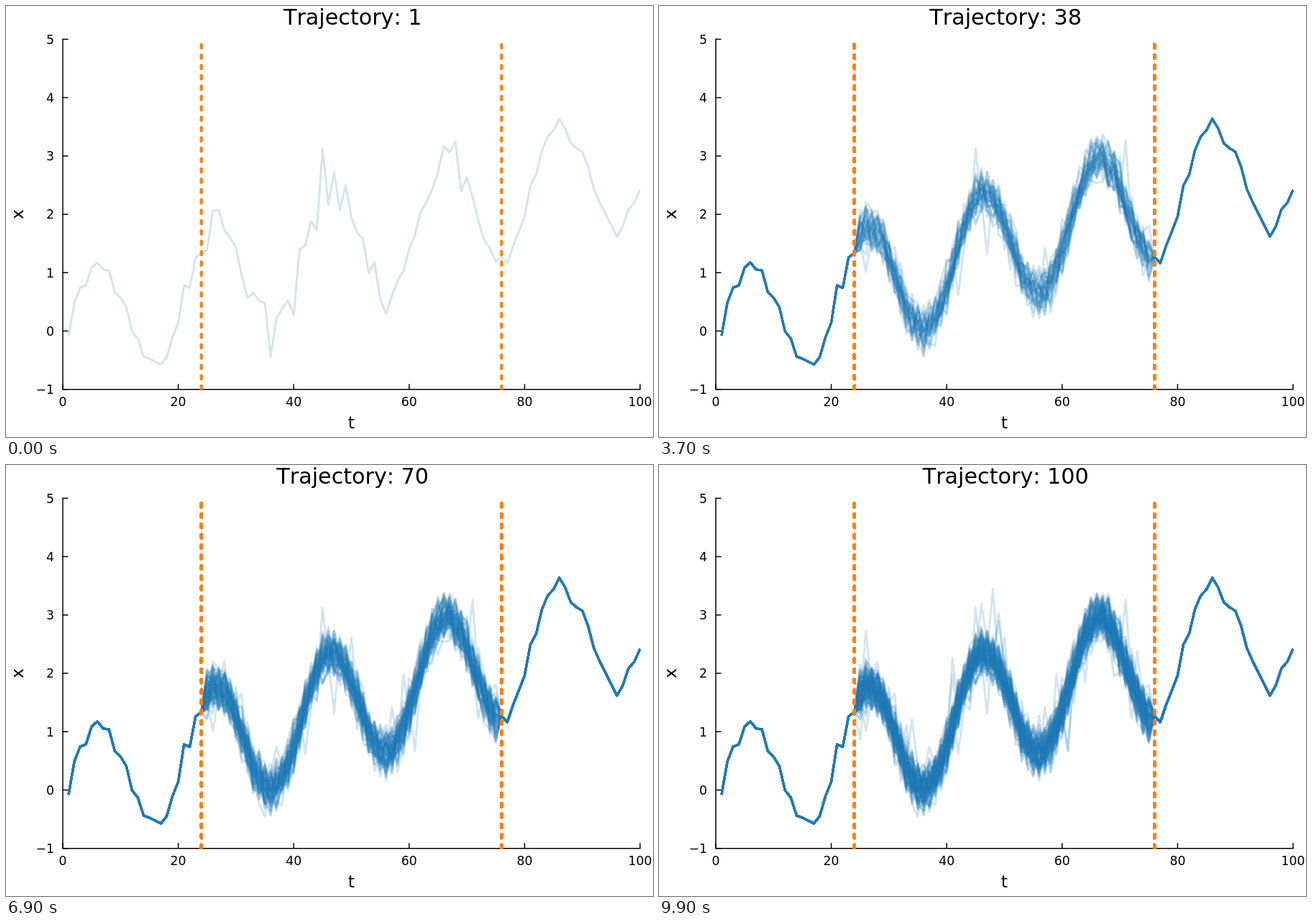
An HTML page with a canvas that plays this animation: 900 px wide and 600 px high, repeating every 10 s.

```html
<!DOCTYPE html>
<html lang="en">
<head>
<meta charset="utf-8">
<title>Trajectories</title>
<style>
  html, body { margin: 0; width: 100%; height: 100%; overflow: hidden; background: #fff; }
  canvas { display: block; width: 900px; height: 600px; }
</style>
</head>
<body>
<canvas id="plot" width="900" height="600"></canvas>
<script>
const ctx = document.getElementById('plot').getContext('2d');
const STEP = 100, COUNT = 100;
const LEFT = 79, RIGHT = 882, TOP = 46.3, BOTTOM = 533.7;
const FROM = 24, TO = 76;
const px = t => LEFT + t * (RIGHT - LEFT) / 100;
const py = v => BOTTOM - (v + 1) * (BOTTOM - TOP) / 6;

// Observed ends shared by all trajectories: heights in pixels up to FROM and from TO on
const head = [459, 413, 392, 389, 364, 357, 367, 368, 398, 406, 419, 453,
  463, 488, 491, 495, 499, 489, 461, 441, 389, 392.5, 350, 344];
const tail = [349, 358, 334, 314, 293, 250, 235, 201, 182, 173, 157, 170,
  191, 198, 203, 224, 255, 273, 289, 305, 321, 307, 283, 274, 256];

let seed = 20;
function random() {
  seed = (Math.imul(seed, 1664525) + 1013904223) >>> 0;
  return seed / 4294967296;
}

// Bell-shaped noise with a rare large jump
function noise() {
  const bell = (random() + random() + random() - 1.5) * 0.4;
  if (random() > 0.006) return bell;
  return (random() < 0.5 ? -1 : 1) * (0.6 + 0.6 * random());
}
const mean = t => 0.03 * t - 0.04 + 1.02 * Math.sin(Math.PI * (t - 1.25) / 10);

// The middle is sampled anew for each trajectory
function samplePath() {
  const middle = [];
  for (let t = FROM + 1; t < TO; t++) middle.push(py(mean(t) + noise()));
  return [...head, ...middle, ...tail];
}
const paths = Array.from({ length: COUNT }, samplePath);

function line(x1, y1, x2, y2) {
  ctx.beginPath();
  ctx.moveTo(x1, y1);
  ctx.lineTo(x2, y2);
  ctx.stroke();
}

function text(str, x, y, size, align = 'center') {
  ctx.font = size + 'px "DejaVu Sans", sans-serif';
  ctx.textAlign = align;
  ctx.fillText(str, x, y);
}

function drawAxes() {
  ctx.strokeStyle = ctx.fillStyle = '#000';
  ctx.lineWidth = 1.5;
  ctx.lineCap = 'butt';
  line(LEFT, TOP - 0.7, LEFT, BOTTOM + 0.7);
  line(LEFT, BOTTOM, RIGHT + 0.7, BOTTOM);
  for (let t = 0; t <= 100; t += 20) {
    line(px(t), BOTTOM, px(t), BOTTOM - 7.5);
    text(t, px(t), 557.3, 17.3);
  }
  for (let v = -1; v <= 5; v++) {
    line(LEFT, py(v), LEFT + 7.5, py(v));
    text(v < 0 ? '\u2212' + -v : v, 66.9, py(v) + 6.3, 17.3, 'right');
  }
  text('t', 480.5, 588, 23.7);
  ctx.save();
  ctx.translate(23.5, 290);
  ctx.rotate(-Math.PI / 2);
  text('x', 0, 0, 23.7);
  ctx.restore();
}

function drawPath(path) {
  ctx.beginPath();
  path.forEach((y, i) => ctx.lineTo(px(i + 1), y));
  ctx.stroke();
}

function draw(n) {
  ctx.fillStyle = '#fff';
  ctx.fillRect(0, 0, 900, 600);
  ctx.fontKerning = 'none';
  drawAxes();
  text('Trajectory: ' + n, 482.2, 26.3, 30.2);

  ctx.save();
  ctx.beginPath();
  ctx.rect(LEFT, TOP, RIGHT - LEFT + 0.5, BOTTOM - TOP + 0.5);
  ctx.clip();
  ctx.lineJoin = 'round';
  ctx.lineWidth = 3;
  ctx.strokeStyle = 'rgba(31, 119, 180, 0.2)';
  paths.slice(0, n).forEach(drawPath);

  // Markers are stroked again with each trajectory, which hardens their edges
  ctx.strokeStyle = '#ff7f0e';
  ctx.lineWidth = 4.2;
  ctx.lineCap = 'round';
  ctx.setLineDash([4.8, 9.6]);
  for (let i = 0; i < n; i++) {
    for (const t of [FROM, TO]) line(px(t), BOTTOM, px(t), TOP + 3);
  }
  ctx.restore();
}

let shown = 0;
function tick() {
  const n = Math.floor(performance.now() / STEP) % COUNT + 1;
  if (n !== shown) draw(shown = n);
  requestAnimationFrame(tick);
}
tick();
</script>
</body>
</html>
```
